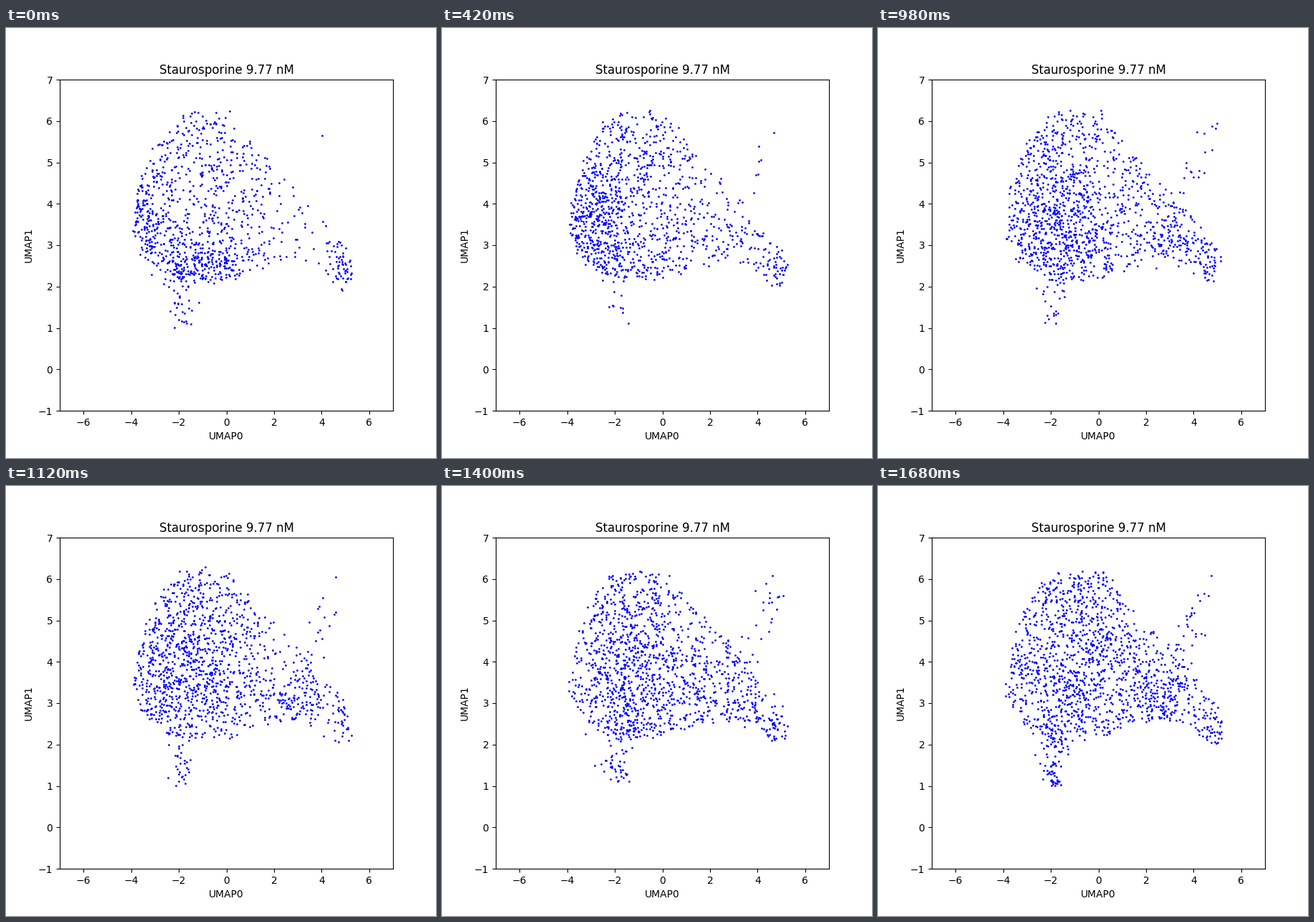
Recreate the animation shown at these times as a matplotlib script. Size 600 by 600 pixels, loop 1.82 s.

```python
import numpy as np
import matplotlib.pyplot as plt
from matplotlib.animation import FuncAnimation

STEPS, INTERVAL = 13, 140
PEAK = 220  # candidate points per unit area

# Lower and upper edge of the cloud along x
EDGE_X = [-3.9, -3.5, -2.6, -1.9, 0.2, 1.4, 2.9, 3.8, 4.9, 5.3]
TOP = [3.8, 4.9, 5.85, 6.2, 6.2, 5.2, 4.5, 3.7, 3.1, 2.5]
LOW = [3.2, 2.75, 2.3, 2.15, 2.2, 2.5, 2.6, 2.4, 1.95, 2.2]


def bump(x, y, cx, cy, sx, sy):
    return np.exp(-((x - cx) / sx) ** 2 - ((y - cy) / sy) ** 2)


def density(x, y, u):
    """Points per unit area at progress u, which runs from 0 to 1."""
    spread = 0.7 + 1.3 * np.sqrt(u)
    base = 14 + 21 / (1 + np.exp(2 * (x - 1.3)))
    spot = (88 - 45 * u) * bump(x, y, -3.4 + 2.3 * u, 3.6, spread, spread)
    band = 65 * np.exp(-8 * u) * bump(x, y, -1.2, 2.5, 2, 0.6)
    bridge = 62 * u * bump(x, y, 2.8, 3.2, 1.4, 0.95)
    tail = 50 * bump(x, y, 4.8, 2.4, 0.6, 0.5)
    return base + spot + band + bridge + tail


def body(rng, u):
    n = int(PEAK * 9.2 * 4.4)
    x = rng.uniform(-3.9, 5.3, n)
    y = rng.uniform(1.9, 6.3, n)
    keep = (y > np.interp(x, EDGE_X, LOW)) & (y < np.interp(x, EDGE_X, TOP))
    keep &= rng.random(n) * PEAK < density(x, y, u)
    jitter = rng.normal(0, 0.05, (2, n))
    return (np.array([x, y]) + jitter)[:, keep]


def stem(rng, u):
    n = round(10 + 78 * u ** 3 + 32 * np.exp(-10 * u))
    y = rng.uniform(1, 2.4, n)
    x = -1.9 + rng.normal(0, 1, n) * (0.2 + 0.17 * (y - 1))
    return np.array([x, y])


def wing(rng, u):
    n = round(1 + 30 * u)
    t = rng.random(n)
    x = 3.4 + 1.3 * t + rng.uniform(-0.6, 0.6, n)
    y = 4 + 2 * t + rng.uniform(-0.3, 0.3, n)
    return np.array([x, y])


def cloud(step):
    rng = np.random.default_rng(977 + step)
    u = step / (STEPS - 1)
    return np.hstack([part(rng, u) for part in (body, stem, wing)])


clouds = [cloud(step) for step in range(STEPS)]

fig = plt.figure(figsize=(6, 6), dpi=100)
ax = fig.add_subplot()
ax.set(xlim=(-7, 7), ylim=(-1, 7), xlabel="UMAP0", ylabel="UMAP1",
       title="Staurosporine 9.77 nM")
dots, = ax.plot([], [], "bo", markersize=1)


def draw(step):
    dots.set_data(*clouds[step])
    return dots,


anim = FuncAnimation(fig, draw, frames=STEPS, interval=INTERVAL, repeat=True,
                     repeat_delay=0)
plt.show()
```
